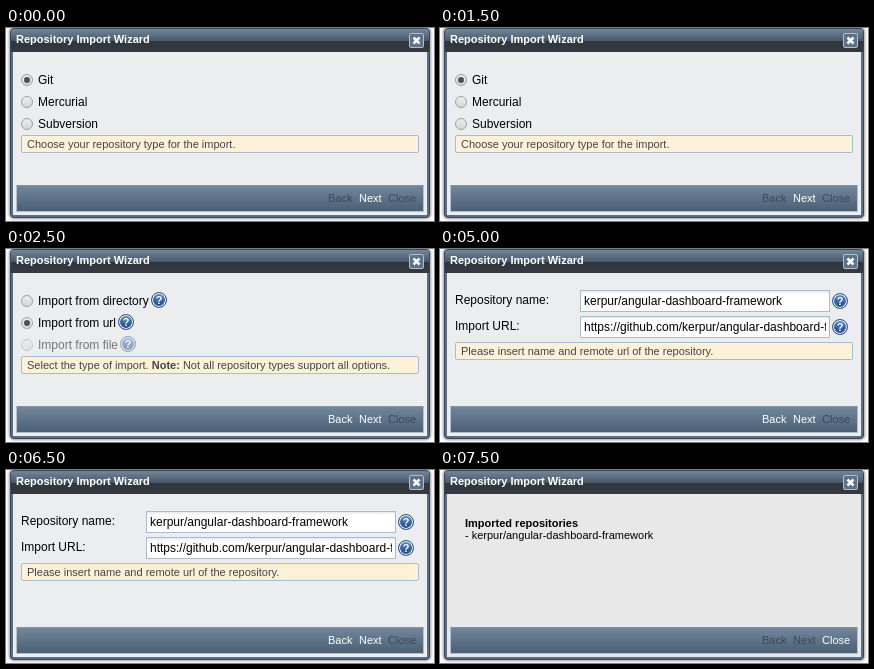
An HTML page for the animation above (10 s loop, 428 by 193 pixels).

```html
<!DOCTYPE html>
<html lang="en">
<head>
<meta charset="utf-8">
<title>Import wizard</title>
<style>
html, body { margin: 0; width: 100%; height: 100%; overflow: hidden; background: #fff; }
body { position: relative; font: 11px/12px "Liberation Sans", Arial, sans-serif; color: #000; }
div, span { position: absolute; box-sizing: border-box; white-space: pre; }
b { font-weight: bold; }
.label { font-size: 12px; line-height: 14px; }
#window { left: 4px; top: 0; width: 420px; height: 190px; border: 1px solid #37475a; border-radius: 4px;
  background: #5b7086; box-shadow: 0 0 3px 1px #999; }
#panel { left: 7px; top: 24px; width: 414px; height: 163px; }
#title { left: 5px; top: 1px; width: 418px; height: 23px; border-radius: 3px 3px 0 0;
  background: linear-gradient(#73879b, #49596a 50%, #30363e 54%, #363a40); }
#close { left: 403px; top: 5px; width: 15px; height: 15px; border: 1px solid #b3c0cd; border-radius: 2px; background: #5d7288; }
#close svg { display: block; }
#bar { left: 10px; top: 157px; width: 408px; height: 27px; border: 1px solid #b4c0cb; border-top-color: #8394a5;
  background: linear-gradient(#71869b, #4b5f75); }
.radio { left: 15px; width: 12px; height: 12px; border: 1px solid #a0a0a0; border-radius: 50%;
  background: linear-gradient(#ececec, #d8d8d8); }
.on::after { content: ""; position: absolute; inset: 2px; border-radius: 50%; background: #505050; }
.help { width: 16px; height: 16px; border: 1px solid #2d5590; border-radius: 50%; color: #fff;
  background: linear-gradient(#5c8cc4, #1c4685); box-shadow: inset 0 0 0 1px #fff;
  font-weight: bold; line-height: 14px; text-align: center; }
.tip { left: 15px; width: 398px; height: 18px; padding: 2px 5px; border: 1px solid #a9bccf; border-radius: 2px;
  background: #fdf2d9; color: #444; }
.input { left: 140px; width: 250px; height: 22px; padding: 3px; border: 1px solid #a9bccf;
  background: linear-gradient(#e4e8ec, #fff 3px); }
.input span { left: 3px; right: 3px; top: 3px; overflow: hidden; }
</style>
</head>
<body>
<div id="window"></div>
<div id="panel"></div>
<div id="title"></div>
<span style="left:10px;top:5px;color:#fff"><b>Repository Import Wizard</b></span>
<div id="close"><svg width="13" height="13"><path d="M3.500 3.500l6 6m0-6l-6 6" stroke="#fff" stroke-width="2.500"/></svg></div>
<div id="bar"></div>
<div id="page"></div>
<script>
const STEP = 2500;
const user = "kerpur", repo = user + "/angular-dashboard-framework";
const panel = document.getElementById("panel");
const page = document.getElementById("page");

const text = (x, y, s, color = "#000") => `<span style="left:${x}px;top:${y}px;color:${color}">${s}</span>`;
const label = (x, y, s) => `<span class="label" style="left:${x}px;top:${y}px">${s}</span>`;
const faded = s => `<div style="opacity:.5">${s}</div>`;

const radio = (y, s, on) =>
  `<div class="radio ${on ? "on" : ""}" style="top:${y}px"></div>` + label(32, y - 1, s);

const help = (x, y) => `<div class="help" style="left:${x}px;top:${y}px">?</div>`;

const tip = (y, s) => `<div class="tip" style="top:${y}px">${s}</div>`;

const input = (y, name, value) =>
  label(15, y + 3, name) +
  `<div class="input" style="top:${y}px"><span class="label">${value}</span></div>` +
  help(392, y + 3);

const buttons = (...on) => ["Back", "Next", "Close"].map((s, i) =>
  text([322, 353, 382][i], 164, s, on[i] ? "#fff" : "#3c4a59")).join("");

const pages = [
  radio(46, "Git", true) + radio(68, "Mercurial") + radio(90, "Subversion") +
    tip(107, "Choose your repository type for the import.") + buttons(0, 1, 0),

  radio(46, "Import from directory") + help(145, 43) +
    radio(68, "Import from url", true) + help(112, 65) +
    faded(radio(90, "Import from file") + help(114, 87)) +
    tip(107, "Select the type of import. <b>Note:</b> Not all repository types support all options.") +
    buttons(1, 1, 0),

  input(41, "Repository name:", repo) +
    input(67, "Import URL:", "https://github.com/" + repo) +
    tip(93, "Please insert name and remote url of the repository.") + buttons(1, 1, 0),

  text(25, 47, "<b>Imported repositories</b>") + text(25, 59, "- " + repo) + buttons(0, 0, 1)
];

let shown = -1;
const start = performance.now();

function draw(now) {
  const i = Math.floor(Math.max(0, now - start) / STEP) % pages.length;
  if (i !== shown) {
    shown = i;
    page.innerHTML = pages[i];
    panel.style.background = i === 3 ? "#e8e8e8" : "#ebedef";
  }
  requestAnimationFrame(draw);
}
draw(start);
</script>
</body>
</html>
```
